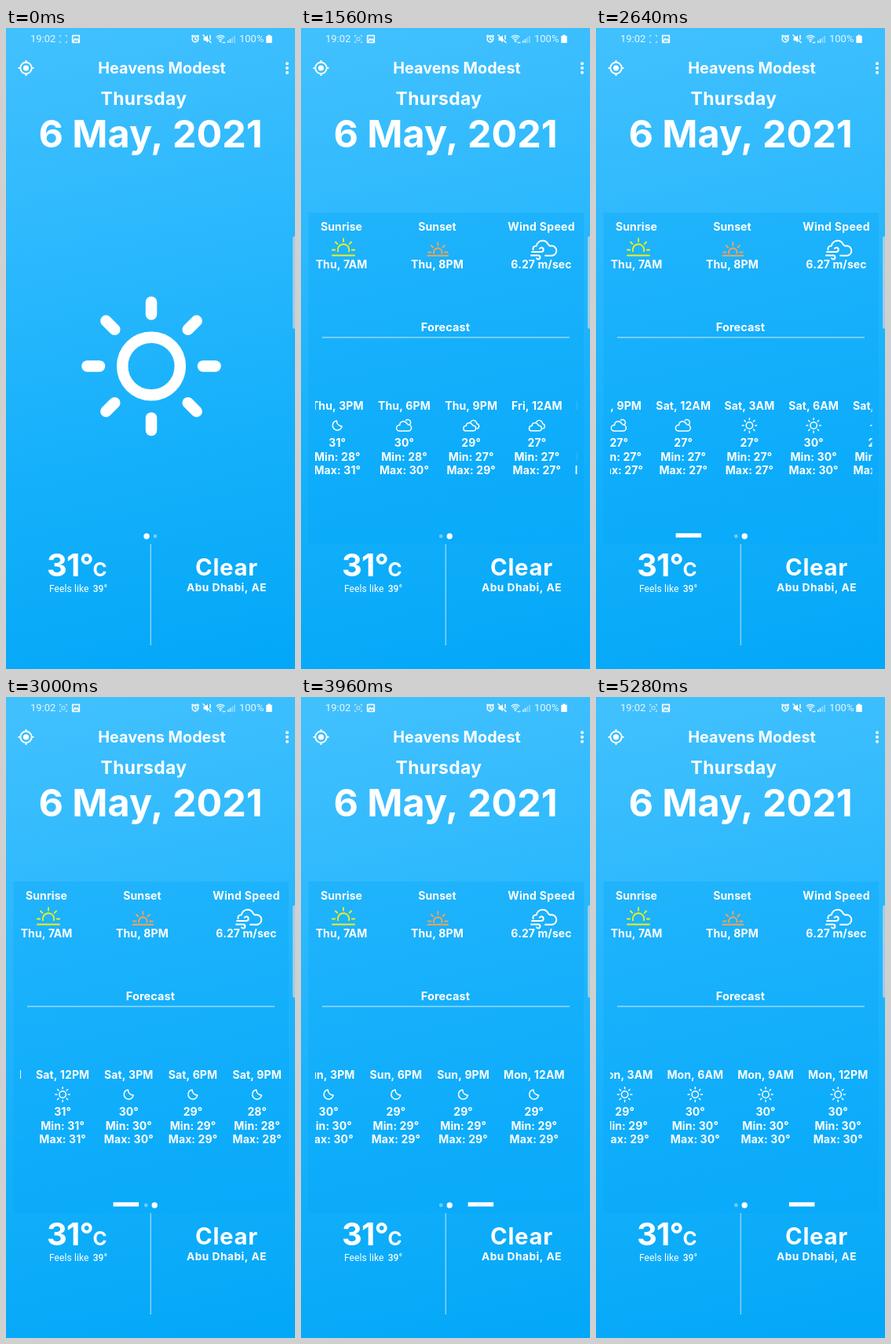
An HTML page with a canvas for the animation above (5400 ms loop, 368 by 816 pixels).

```html
<!DOCTYPE html>
<html lang="en">
<head>
<meta charset="utf-8">
<title>Weather</title>
<style>
html, body { margin: 0; width: 100%; height: 100%; overflow: hidden; background: #1fb2fc; }
canvas { display: block; width: 368px; height: 816px; }
</style>
</head>
<body>
<canvas id="stage"></canvas>
<script>
const W = 368, H = 816, LOOP = 5400, STEP = 120, TAU = Math.PI * 2;
const canvas = document.getElementById('stage');
const ctx = canvas.getContext('2d');
const ratio = window.devicePixelRatio || 1;
canvas.width = W * ratio;
canvas.height = H * ratio;

// [time, value] keys, joined by a smooth curve that never overshoots
const pageKeys = [[60, 368], [240, 285], [360, 165], [480, 62], [600, 19], [720, 5], [960, 0]];
const scrollKeys = [[1320, 0], [1560, 23], [2640, 842], [3480, 1689], [4440, 2236], [5280, 2372]];

const temps = [31, 30, 29, 27, 28, 30, 31, 30, 29, 28, 27, 27, 27, 30, 29, 31,
  30, 29, 28, 27, 28, 30, 31, 30, 30, 29, 29, 29, 29, 30, 30, 30];
const firstLows = [28, 28, 27];
const skies = 'mfcccfssmmffssssmmmmssssmmmmssss';
const dayNames = ['Thu', 'Fri', 'Sat', 'Sun', 'Mon'];
const dayWidths = [66.5, 58.5, 63, 67, 71];
const hours = ['12AM', '3AM', '6AM', '9AM', '12PM', '3PM', '6PM', '9PM'];

let nextLeft = 36;
const items = temps.map((temp, i) => {
  const slot = i + 5, day = Math.floor(slot / 8), hour = hours[slot % 8];
  const width = dayWidths[day] + (hour.startsWith('12') ? 5 : 0);
  const x = nextLeft + width / 2;
  nextLeft += width + 18.7;
  return { x, label: `${dayNames[day]}, ${hour}`, temp, low: firstLows[i] ?? temp, sky: skies[i] };
});

function curve(keys, t) {
  const last = keys.length - 1;
  if (t <= keys[0][0]) return keys[0][1];
  if (t >= keys[last][0]) return keys[last][1];
  const slope = i => (keys[i + 1][1] - keys[i][1]) / (keys[i + 1][0] - keys[i][0]);
  const tangent = i => {
    if (i === 0 || i === last) return 0;
    const a = slope(i - 1), b = slope(i);
    return 2 * a * b / (a + b);
  };
  let i = 0;
  while (t >= keys[i + 1][0]) i++;
  const [t0, v0] = keys[i], [t1, v1] = keys[i + 1];
  const d = t1 - t0, u = (t - t0) / d, r = 1 - u;
  return (1 + 2 * u) * r * r * v0 + u * r * r * d * tangent(i)
    + u * u * (3 - 2 * u) * v1 - u * u * r * d * tangent(i + 1);
}

function text(str, x, y, size, { weight = 700, spacing = 0.1, align = 'center', family = 'Inter' } = {}) {
  ctx.font = `${weight} ${size}px ${family}, sans-serif`;
  ctx.letterSpacing = spacing + 'px';
  ctx.textAlign = align;
  ctx.fillText(str, x, y);
}

function dot(x, y, r) {
  ctx.beginPath();
  ctx.arc(x, y, r, 0, TAU);
  ctx.fill();
}

function ring(x, y, r, from = 0, to = TAU) {
  ctx.beginPath();
  ctx.arc(x, y, r, from, to);
  ctx.stroke();
}

function line(...points) {
  ctx.beginPath();
  for (let i = 0; i < points.length; i += 2) ctx.lineTo(points[i], points[i + 1]);
  ctx.stroke();
}

function rays(x, y, inner, outer, from, step, count) {
  for (let i = 0; i < count; i++) {
    const a = from + i * step, c = Math.cos(a), s = Math.sin(a);
    line(x + c * inner, y + s * inner, x + c * outer, y + s * outer);
  }
}

function pen(color, width, cap = 'round') {
  ctx.strokeStyle = color;
  ctx.lineWidth = width;
  ctx.lineCap = cap;
  ctx.lineJoin = 'round';
}

function cloud(x, y, k) {
  ctx.beginPath();
  ctx.arc(x - 5.5 * k, y + 2.5 * k, 3.7 * k, Math.PI / 2, Math.PI * 1.55);
  ctx.arc(x - 0.5 * k, y - 1 * k, 4.8 * k, Math.PI * 1.08, Math.PI * 1.85);
  ctx.arc(x + 5.5 * k, y + 2.3 * k, 3.9 * k, Math.PI * 1.5, Math.PI * 2.5);
  ctx.closePath();
  ctx.stroke();
}

const skyIcons = {
  m(x, y) {
    ctx.beginPath();
    ctx.arc(x, y, 6, 0.15, Math.PI * 1.45);
    ctx.quadraticCurveTo(x - 0.5, y + 0.5, x + 5.9, y + 0.9);
    ctx.closePath();
    ctx.stroke();
  },
  f(x, y) {
    cloud(x - 0.5, y + 0.7, 1.02);
    ring(x + 4.5, y - 3.8, 3.6, -2.3, 0.9);
  },
  c(x, y) {
    cloud(x - 2, y + 1.5, 0.85);
    ctx.beginPath();
    ctx.arc(x + 3, y - 2.5, 4, -2.7, -0.4);
    ctx.arc(x + 7, y + 1, 3, -1.4, 1.4);
    ctx.stroke();
  },
  s(x, y) {
    ring(x, y, 4.2);
    rays(x, y, 7.2, 9.2, 0, Math.PI / 4, 8);
  }
};

function background() {
  const g = ctx.createLinearGradient(100, 0, 268, H);
  g.addColorStop(0, '#41c0fe');
  g.addColorStop(0.3, '#2db9fd');
  g.addColorStop(0.65, '#15b0fb');
  g.addColorStop(1, '#04a8f8');
  ctx.fillStyle = g;
  ctx.fillRect(0, 0, W, H);
}

function statusBar(t) {
  ctx.fillStyle = 'rgba(255,255,255,.88)';
  text('19:02', 31, 18, 13, { weight: 400, spacing: 0, align: 'left', family: 'Roboto' });
  text('100%', 297, 18, 13, { weight: 400, spacing: 0, align: 'left', family: 'Roboto' });
  pen('rgba(255,255,255,.65)', 1, 'butt');
  for (const sx of [-1, 1]) for (const sy of [-1, 1]) {
    line(73 + sx * 2.5, 14 + sy * 4.5, 73 + sx * 4.5, 14 + sy * 4.5, 73 + sx * 4.5, 14 + sy * 2.5);
  }
  if (t % 2000 >= 680) ctx.strokeRect(71, 12, 4, 4);

  pen('rgba(255,255,255,.92)', 1.7);
  ctx.strokeRect(84.7, 9.7, 8.6, 8.6);
  line(86, 16.5, 88, 13.5, 89.5, 15.5, 91, 14, 93, 17);

  ring(241, 14, 3.8);
  line(241, 12, 241, 14.2, 242.5, 15);
  line(236.8, 10.5, 238, 9.4);
  line(245.2, 10.5, 244, 9.4);
  ctx.fillStyle = '#fff';
  ctx.beginPath();
  for (const [x, y] of [[251.5, 12], [254, 12], [257, 9], [257, 18.5], [254, 16], [251.5, 16]]) ctx.lineTo(x, y);
  ctx.fill();
  line(251, 9, 261, 18.5);
  line(260, 9.5, 260, 14);

  pen('rgba(255,255,255,.8)', 1.4);
  for (const r of [2.5, 5, 7.5]) ring(273, 17, r, -2.3, -0.85);
  dot(273, 17, 1.2);
  line(276, 18.5, 279, 18.5);
  for (let i = 0; i < 4; i++) {
    ctx.fillStyle = i < 2 ? 'rgba(255,255,255,.75)' : 'rgba(255,255,255,.4)';
    ctx.fillRect(282 + i * 2.7, 16 - i * 2, 1.7, 3 + i * 2);
  }
  ctx.fillStyle = '#fff';
  ctx.fillRect(331.3, 10, 7.4, 9);
  ctx.fillRect(333.3, 8.7, 3.4, 2);
}

function header() {
  ctx.fillStyle = '#fff';
  pen('#fff', 1.9, 'butt');
  ring(25.5, 51, 7.2);
  rays(25.5, 51, 7, 10, 0, Math.PI / 2, 4);
  dot(25.5, 51, 3.6);
  for (const y of [45.3, 51, 56.7]) dot(358, y, 2);
  text('Heavens Modest', 198.5, 58, 19.8, { spacing: 0 });
  text('Thursday', 175.5, 98, 22.8, { spacing: 0.4 });
  text('6 May, 2021', 184, 152, 48.5, { spacing: 0 });
}

function footer() {
  ctx.fillStyle = '#fff';
  text('31°', 52, 698, 40, { spacing: -0.8, align: 'left' });
  text('C', 110.5, 698, 24.5, { align: 'left' });
  text('Feels like', 55, 718, 12, { weight: 400, align: 'left', family: 'Roboto' });
  text('39°', 129, 718, 12, { weight: 500, spacing: 0, align: 'right', family: 'Roboto' });
  text('Clear', 281, 697, 29.3, { spacing: 0.7 });
  text('Abu Dhabi, AE', 281, 717, 13.7, { spacing: 0.5 });
  ctx.fillStyle = 'rgba(232,240,238,.6)';
  ctx.fillRect(183.6, 657, 1.4, 129);
}

function pageDots(progress) {
  const spot = (x, active) => {
    ctx.fillStyle = `rgba(255,255,255,${0.4 + 0.6 * active})`;
    dot(x, 647, 2.4 + 1.3 * active);
  };
  spot(179 - 0.7 * progress, 1 - progress);
  spot(190 - 0.8 * progress, progress);
}

function bigSun() {
  pen('#fff', 14.5);
  ring(185, 430.5, 36.8);
  rays(185, 430.5, 66, 81.5, 0, Math.PI / 4, 8);
}

function halfSun(x, y, r, half, color, base) {
  pen(color, 1.9);
  ring(x, y, r, Math.PI * 0.92, Math.PI * 2.08);
  rays(x, y, r + 3.6, r + 7, Math.PI, Math.PI / 4, 5);
  line(x - half, base, x + half, base);
}

function windIcon() {
  pen('#fff', 2);
  ctx.beginPath();
  ctx.arc(299, 281, 3.6, Math.PI * 0.9, Math.PI * 1.55);
  ctx.arc(307.5, 278.5, 7.8, Math.PI * 1.05, Math.PI * 1.87);
  ctx.arc(319, 283.5, 6.3, Math.PI * 1.4, Math.PI * 2.5);
  ctx.lineTo(311, 289.8);
  ctx.stroke();
  ctx.beginPath();
  ctx.moveTo(294, 285);
  ctx.lineTo(306, 285);
  ctx.arc(306, 282.3, 2.7, Math.PI / 2, -Math.PI * 0.8, true);
  ctx.stroke();
  ctx.beginPath();
  ctx.moveTo(293, 289.6);
  ctx.lineTo(302, 289.6);
  ctx.arc(302, 292, 2.4, -Math.PI / 2, Math.PI * 0.8);
  ctx.stroke();
}

function forecastList(scroll) {
  ctx.save();
  ctx.beginPath();
  ctx.rect(18, 460, 333.5, 130);
  ctx.clip();
  pen('#fff', 1.5);
  for (const { x, label, temp, low, sky } of items) {
    const cx = x - scroll;
    if (cx < -40 || cx > W + 40) continue;
    text(label, cx, 485.5, 14);
    skyIcons[sky](cx, 506);
    text(`${temp}°`, cx, 533, 14);
    text(`Min: ${low}°`, cx, 550.5, 14);
    text(`Max: ${temp}°`, cx, 567.5, 14);
  }
  ctx.restore();
}

function details(scroll) {
  ctx.fillStyle = 'rgba(0,165,248,.32)';
  ctx.fillRect(9.5, 235, 350.5, 422);
  ctx.fillStyle = '#fff';
  text('Sunrise', 51.5, 257.5, 14);
  text('Sunset', 173.5, 257.5, 14);
  text('Wind Speed', 306, 257.5, 14, { spacing: 0.3 });
  halfSun(54, 282.5, 7.2, 14, '#eef01c', 289.5);
  halfSun(174.3, 285.5, 5.2, 13, '#efa558', 289.7);
  windIcon();
  text('Thu, 7AM', 51.5, 305.5, 14);
  text('Thu, 8PM', 173.5, 305.5, 14);
  text('6.27 m/sec', 306, 305.5, 14);
  text('Forecast', 184, 385.5, 14.5);
  ctx.fillStyle = 'rgba(232,240,238,.65)';
  ctx.fillRect(27, 393.2, 315, 1.4);
  ctx.fillStyle = '#fff';
  forecastList(scroll);
}

function draw(t) {
  const offset = curve(pageKeys, t), scroll = curve(scrollKeys, t);
  ctx.setTransform(ratio, 0, 0, ratio, 0, 0);
  background();
  ctx.save();
  ctx.translate(offset - W, 0);
  bigSun();
  ctx.translate(W, 0);
  if (offset < W) details(scroll);
  ctx.restore();
  statusBar(t);
  header();
  footer();
  pageDots(1 - offset / W);
  if (t > 1560) {
    ctx.fillStyle = '#fff';
    ctx.fillRect(22.2 + scroll * 0.0943, 643.2, 32.5, 5.4);
  }
  ctx.fillStyle = 'rgba(198,214,222,.75)';
  ctx.beginPath();
  ctx.roundRect(365, 265, 8, 118, 3);
  ctx.fill();
}

const start = performance.now();
function tick() {
  const t = (performance.now() - start) % LOOP;
  draw(Math.floor(t / STEP) * STEP);
  requestAnimationFrame(tick);
}
tick();
</script>
</body>
</html>
```
